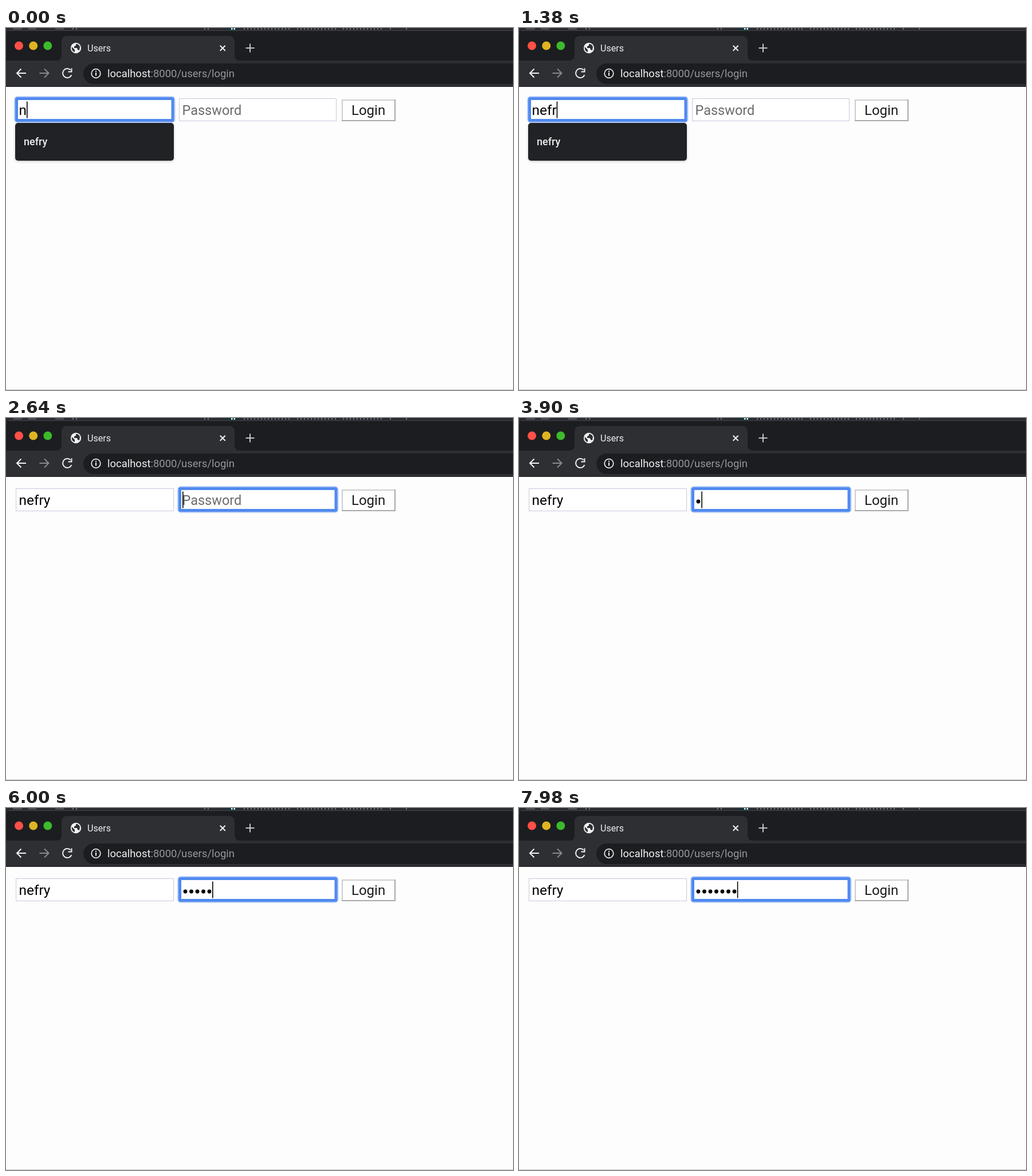
Animation of 885x633 px, one loop 8 s. Source, as an HTML page:

```html
<!DOCTYPE html>
<html lang="en">
<head>
<meta charset="utf-8">
<title>Users</title>
<style>
  html, body { margin: 0; width: 100%; height: 100%; overflow: hidden; background: #fdfdfd; }
  svg { display: block; width: 100vw; height: 100vh; font-family: Roboto, Inter, sans-serif; }
  .icon { fill: none; stroke: #f1f1f2; stroke-width: 2; }
  .box { fill: #fff; stroke: #c9c9de; }
  .glow { fill: #fff; stroke: #b9cff9; stroke-width: 9; }
  .ring { fill: #fff; stroke: #5189ef; stroke-width: 5; }
</style>
</head>
<body>
<svg viewBox="0 0 885 633" preserveAspectRatio="none">
  <rect width="885" height="633" fill="#fdfdfd"/>
  <path d="M0 632.5H885" stroke="#c6c6c6"/>

  <!-- window behind, cut off by the browser -->
  <rect width="885" height="8" fill="#292b31"/>
  <path d="M386 0h17v4h-17z" fill="#12343a"/>
  <path d="M12 1.5h16M38 1.5h15M86 1.5h15" stroke="#4a4c52" stroke-width="3"/>
  <path d="M116 1.5h11M346 1.5h11M415 1.5h81M508 1.5h70M588 1.5h70M670 1.5h2M698 1.5h2" stroke="#85878c" stroke-width="2" stroke-dasharray="2 4"/>
  <path d="M393 1.5h7" stroke="#d5e4e5" stroke-width="3" stroke-dasharray="2.5 2"/>

  <!-- browser frame -->
  <path d="M0 103V10Q0 5 5 5H885V103Z" fill="#1c1d20"/>
  <path d="M4 4.5H885" stroke="#46474b"/>
  <path d="M0 57H87Q97 57 97 47V24Q97 14 107 14H389Q399 14 399 24V47Q399 57 409 57H885V103H0Z" fill="#2e2f33"/>
  <path d="M0 102.5H885" stroke="#1f2023"/>
  <path d="M885 62H153a18 18 0 0 0 0 36H885Z" fill="#1c1d20"/>
  <circle cx="22.5" cy="31" r="7.5" fill="#ff5047"/>
  <circle cx="47.7" cy="31" r="7.5" fill="#dfb422"/>
  <circle cx="72.8" cy="31" r="7.5" fill="#3cba2c"/>

  <circle cx="122" cy="35" r="9.2" fill="#f1f1f2"/>
  <path d="M115 33l5 5v4c-4-1-6-5-5-9zM122 28c4 0 6 2 7 5l-1 6-3-1-1-3h-5v-3l3-1z" fill="#2e2f33"/>
  <text x="142" y="40.5" font-size="16.1" fill="#eeeef0">Users</text>
  <path class="icon" d="M373.7 30.7l9 9m0-9l-9 9"/>
  <path class="icon" d="M418.5 35h15M426 27.5v15" style="stroke:#c5c5c8"/>

  <path class="icon" d="M35 79H19M26.5 71.5L19 79l7.5 7.5"/>
  <path class="icon" d="M58.5 79h16M67 71.5l7.5 7.5-7.5 7.5" style="stroke:#88898d"/>
  <path class="icon" d="M114.4 82.2A8 8 0 1 1 112.6 73.3M114.5 70.5V76.5H108.5"/>
  <circle class="icon" cx="157" cy="79.5" r="7.8" style="stroke-width:1.7"/>
  <path class="icon" d="M157 78v5.5M157 74.8v2"/>
  <text x="177" y="85.5" font-size="18.47" fill="#96979b"><tspan fill="#f1f1f2">localhost</tspan>:8000/users/login</text>

  <!-- login form -->
  <rect class="box" x="17.5" y="123.5" width="275" height="39"/>
  <rect class="box" x="302.5" y="123.5" width="274" height="39"/>
  <g id="focus">
    <rect class="glow" x="18.5" y="123.5" width="272.5" height="38" rx="2"/>
    <rect class="ring" x="18.5" y="123.5" width="272.5" height="38" rx="1"/>
  </g>
  <rect x="586" y="125" width="94" height="38" fill="#fefefe"/>
  <path d="M587 163V126H680" fill="none" stroke="#cdcdcf" stroke-width="2"/>
  <path d="M586 162H679V125" fill="none" stroke="#a9a9ab" stroke-width="2"/>
  <text x="603" y="152" font-size="24" fill="#1b1b1d">Login</text>

  <text id="name" x="22.5" y="152" font-size="24.4"></text>
  <text id="hint" x="307.5" y="152" font-size="23.5" fill="#6b6b6b">Password</text>
  <g id="dots"></g>
  <rect id="caret" y="128.5" width="1.6" height="29"/>

  <g id="menu">
    <rect x="16" y="167.5" width="277" height="66" rx="5" opacity=".2" style="filter:blur(2px)"/>
    <rect x="16" y="166" width="277" height="66" rx="5" fill="#202225"/>
    <text id="option" x="31" y="205" font-size="18" font-weight="500" fill="#eeeef0"></text>
  </g>
</svg>
<script>
  const LOOP = 8000, BLINK = 500;
  const USER = 'nefry';
  const nameKeys = [0, 400, 780, 1120, 1480];
  const tabKey = 2220;
  const passwordKeys = [3740, 4140, 4440, 4740, 5560, 6300, 6900];

  const el = id => document.getElementById(id);
  const show = (node, on) => node.setAttribute('visibility', on ? 'visible' : 'hidden');
  const pressed = (keys, t) => keys.filter(k => k <= t).length;

  el('option').textContent = USER;
  el('dots').innerHTML = passwordKeys
    .map((_, i) => `<circle cx="${313 + 10.5 * i}" cy="146" r="3.4"/>`).join('');
  const dots = [...el('dots').children];

  function draw(t) {
    const letters = pressed(nameKeys, t);
    const typed = pressed(passwordKeys, t);
    const inPassword = t >= tabKey;

    el('name').textContent = USER.slice(0, letters);
    show(el('menu'), letters < USER.length);
    show(el('hint'), !typed);
    dots.forEach((dot, i) => show(dot, i < typed));
    el('focus').setAttribute('transform', `translate(${inPassword ? 285 : 0})`);

    // each key press restarts the caret blink
    const lastKey = Math.max(...[...nameKeys, tabKey, ...passwordKeys].filter(k => k <= t));
    const caretX = inPassword ? 308 + 10.4 * typed : 22.5 + el('name').getComputedTextLength();
    el('caret').setAttribute('x', caretX);
    show(el('caret'), (t - lastKey) % (2 * BLINK) < BLINK);
  }

  const start = performance.now();
  function tick() {
    draw((performance.now() - start) % LOOP);
    requestAnimationFrame(tick);
  }
  tick();
</script>
</body>
</html>
```
